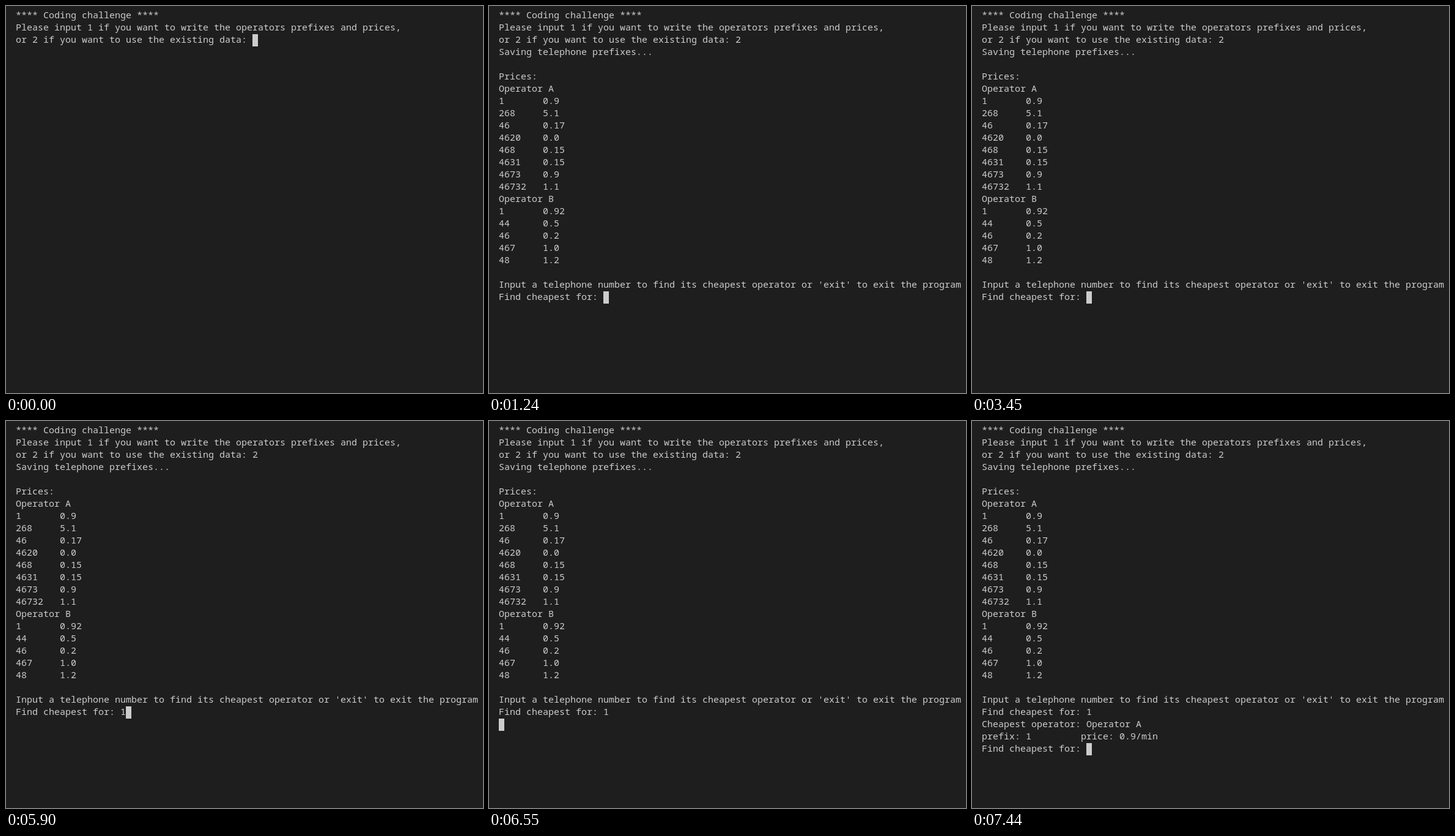
An HTML page that plays this animation: 780x632 px, repeating every 8 s.

```html
<!DOCTYPE html>
<html lang="en">
<head>
<meta charset="utf-8">
<title>Terminal session</title>
<style>
  html, body { margin: 0; width: 100%; height: 100%; overflow: hidden; background: #1e1e1e; }
  pre {
    position: absolute; left: 16px; top: 4px; margin: 0;
    font: 15px/20px "Noto Sans Mono", monospace; color: #ccc; tab-size: 8;
  }
  #cursor { position: absolute; width: 9px; height: 20px; background: #ccc; }
</style>
</head>
<body>
<pre id="output"></pre>
<div id="cursor"></div>
<script>
const LOOP = 8000, LEFT = 16, TOP = 6, CELL = 8.99, LINE = 20;

// Each entry is a time in ms and the text the terminal gains then.
const steps = [
  [0, `**** Coding challenge ****
Please input 1 if you want to write the operators prefixes and prices,
or 2 if you want to use the existing data: `],
  [500, '2'],
  [1240, `
Saving telephone prefixes...

Prices:
Operator A
1\t0.9
268\t5.1
46\t0.17
4620\t0.0
468\t0.15
4631\t0.15
4673\t0.9
46732\t1.1
Operator B
1\t0.92
44\t0.5
46\t0.2
467\t1.0
48\t1.2

Input a telephone number to find its cheapest operator or 'exit' to exit the program
Find cheapest for: `],
  [4930, '1'],
  [6550, '\n'],
  [6590, `Cheapest operator: Operator A
prefix: 1         price: 0.9/min
Find cheapest for: `],
];

const output = document.getElementById('output');
const cursor = document.getElementById('cursor');
const start = performance.now();
let shown;

function render(time) {
  const text = steps.filter(([at]) => at <= time).map(([, added]) => added).join('');
  if (text === shown) return;
  shown = output.textContent = text;
  const lines = text.split('\n');
  cursor.style.left = LEFT + lines.at(-1).length * CELL + 'px';
  cursor.style.top = TOP + (lines.length - 1) * LINE + 'px';
}

function tick() {
  render((performance.now() - start) % LOOP);
  requestAnimationFrame(tick);
}
tick();
</script>
</body>
</html>
```
